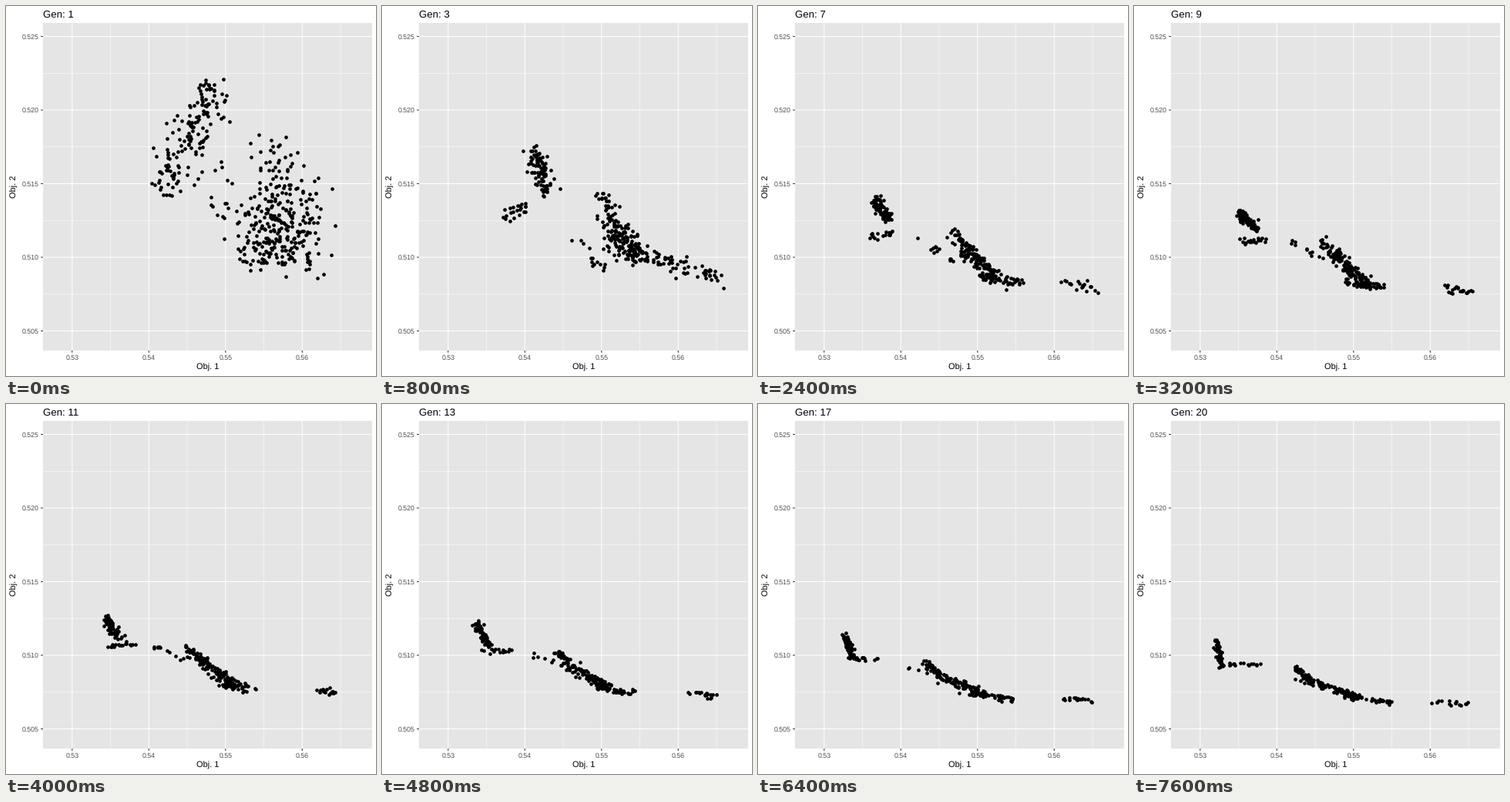
Write a matplotlib script that moves like this. It is 480x480 px and loops after 8000 ms.

```python
import numpy as np
import matplotlib.pyplot as plt
from matplotlib.animation import FuncAnimation
from matplotlib.patches import Rectangle

SIZE, GENERATIONS, INTERVAL = 480, 20, 400
LEFT, TOP, RIGHT, BOTTOM = 48, 22, 474.5, 447

plt.rcParams["font.family"] = "Liberation Sans"
plt.rcParams["text.hinting"] = "none"
rng = np.random.default_rng(12)

# Each band of the front: (count, spread, spine end points at the key generations).
KEY_GENS = np.log([1, 3, 9, 20])
BANDS = [
    # left island, steep and flat side
    (118, 34, [(208, 218, 278, 92), (192, 182, 216, 246),
               (134, 266, 160, 292), (106, 304, 114, 342)]),
    (28, 26, [(190, 242, 235, 205), (152, 272, 188, 262),
              (136, 307, 172, 303), (114, 338, 164, 338)]),
    # main front: neck, core and tail
    (65, 40, [(345, 165, 345, 290), (280, 240, 302, 302),
              (240, 304, 268, 330), (206, 340, 228, 357)]),
    (135, 52, [(298, 280, 402, 285), (296, 288, 335, 328),
               (258, 324, 301, 360), (220, 357, 292, 381)]),
    (75, 32, [(300, 318, 396, 321), (315, 321, 412, 341),
              (273, 359, 324, 365), (272, 379, 335, 388)]),
    # right island
    (32, 32, [(388, 225, 416, 355), (370, 342, 450, 352),
              (398, 364, 440, 373), (386, 386, 434, 389)]),
    # stragglers between the islands
    (18, 26, [(272, 200, 288, 320), (250, 295, 290, 350),
              (192, 299, 245, 330), (188, 350, 250, 369)]),
]


def spine_at(spines, gen):
    """Start and span of a band, eased along the logarithm of the generation."""
    x0, y0, x1, y1 = (np.interp(np.log(gen), KEY_GENS, key)
                      for key in zip(*spines))
    return np.array([x0, y0]), np.array([x1 - x0, y1 - y0])


def evolve(count, spread, spines):
    """Members still inside the moving band survive; the others are replaced."""
    history, members = [], None
    for gen in range(1, GENERATIONS + 1):
        start, span = spine_at(spines, gen)
        normal = np.array([-span[1], span[0]]) / np.hypot(*span)
        width = spread * gen ** -0.65
        along = rng.beta(1.3, 1.3, (count, 1))
        across = rng.normal(0, 0.4 * width, (count, 1))
        offspring = start + along * span + across * normal
        if members is not None:
            offset = members - start
            progress = offset @ span / (span @ span)
            survives = ((progress > 0) & (progress < 1)
                        & (abs(offset @ normal) < 0.5 * width))
            offspring[survives] = members[survives]
        members = offspring
        # Duplicates overlap, so fewer distinct points remain visible.
        history.append(members[:int(count * gen ** -0.2)])
    return history


populations = [np.vstack(parts)
               for parts in zip(*(evolve(*band) for band in BANDS))]


def px(value):
    return 85.8 + (value - 0.53) * 9950


def py(value):
    return 39.5 + (0.525 - value) * 19100


fig = plt.figure(figsize=(SIZE / 72, SIZE / 72), dpi=72, facecolor="white")
ax = fig.add_axes([0, 0, 1, 1])
ax.set(xlim=(0, SIZE), ylim=(SIZE, 0))
ax.axis("off")
ax.add_patch(Rectangle((LEFT, TOP), RIGHT - LEFT, BOTTOM - TOP,
                       facecolor="#e5e5e5", linewidth=0, zorder=0))


def line(xs, ys, color="white", width=1.07):
    ax.plot(xs, ys, color=color, lw=width, solid_capstyle="butt",
            snap=False, zorder=1)


def label(x, y, text, size, color="black", **options):
    return ax.text(x, y, text, fontsize=size, color=color, **options)


for value in np.arange(0.535, 0.57, 0.01):
    line([px(value)] * 2, [TOP, BOTTOM], width=0.53)
for value in np.arange(0.5075, 0.525, 0.005):
    line([LEFT, RIGHT], [py(value)] * 2, width=0.53)
for value in (0.53, 0.54, 0.55, 0.56):
    x = px(value)
    line([x, x], [TOP, BOTTOM])
    line([x, x], [BOTTOM, BOTTOM + 2.75], "#333333")
    label(x, 459, f"{value:.2f}", 8.8, "#4d4d4d", ha="center")
for value in (0.505, 0.510, 0.515, 0.520, 0.525):
    y = py(value)
    line([LEFT, RIGHT], [y, y])
    line([LEFT - 2.75, LEFT], [y, y], "#333333")
    label(43, y + 3.2, f"{value:.3f}", 8.8, "#4d4d4d", ha="right")

label((LEFT + RIGHT) / 2, 472, "Obj. 1", 11, ha="center")
label(13.3, (TOP + BOTTOM) / 2, "Obj. 2", 11, rotation=90, ha="center",
      va="baseline", rotation_mode="anchor")
title = label(LEFT, 15, "", 13.2)
dots = ax.scatter([], [], s=4.7 ** 2, color="black", linewidths=0, zorder=2)
dots.set_snap(False)


def update(frame):
    title.set_text(f"Gen: {frame + 1}")
    dots.set_offsets(populations[frame])
    return title, dots


anim = FuncAnimation(fig, update, frames=GENERATIONS, interval=INTERVAL,
                     repeat=True, repeat_delay=0)
plt.show()
```
